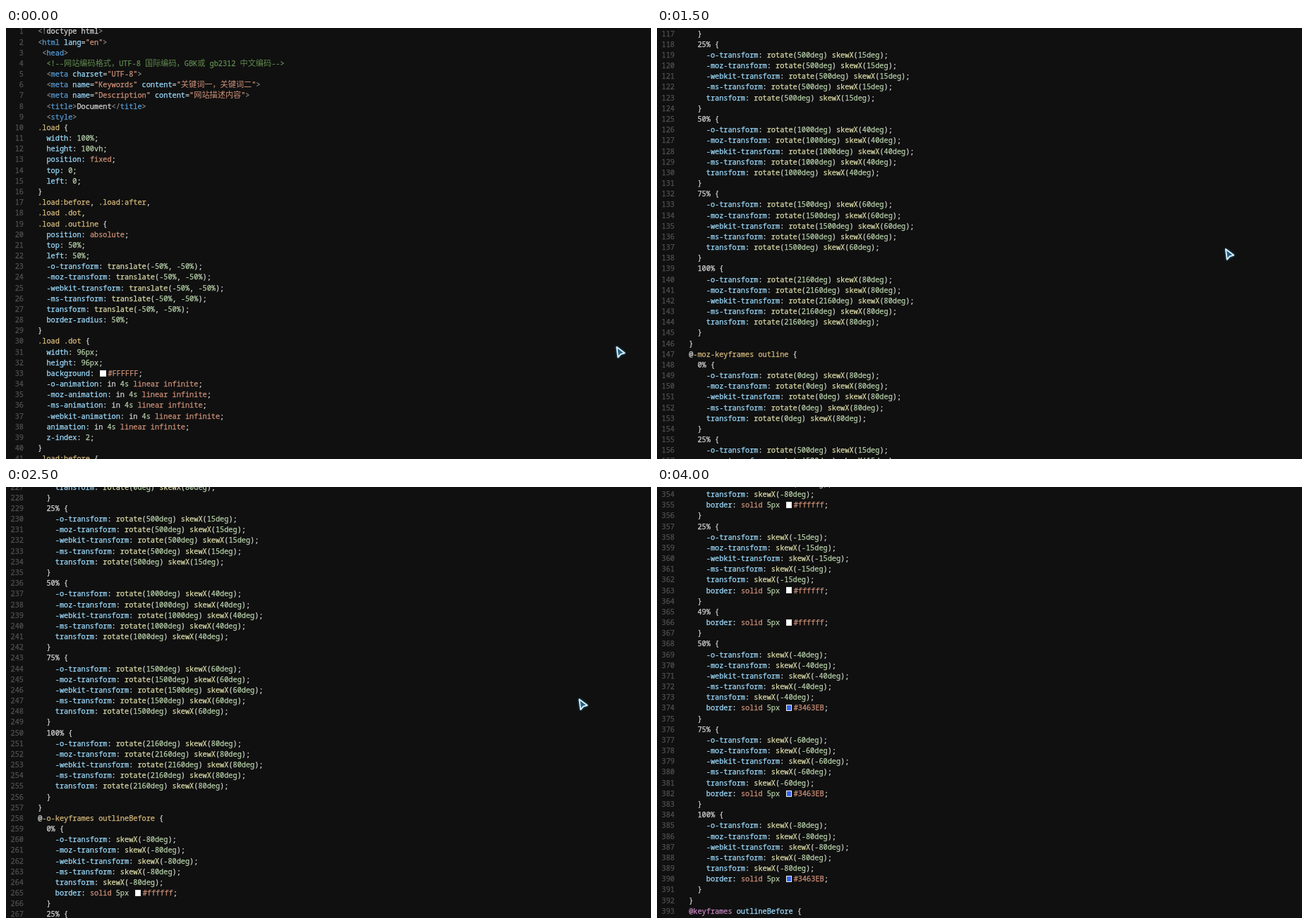
Animation of 914x612 px, one loop 4.1 s. Source, as an HTML page:

```html
<!DOCTYPE html>
<html lang="en">
<head>
<meta charset="UTF-8">
<title>Scrolling stylesheet</title>
<style>
  html, body { margin: 0; width: 100%; height: 100%; overflow: hidden; background: #101010; }
  #stage { position: relative; width: 914px; height: 612px; overflow: hidden; background: #101010; }
  /* The line height is a multiple of 1/64 px, so that rows add up exactly */
  #code {
    position: absolute; left: 0; top: -2.6px; width: 100%;
    font: 10.243px/15.171875px "Noto Sans Mono", "DejaVu Sans Mono", monospace;
    font-variant-ligatures: none; white-space: pre; color: #d4d4d4;
    -webkit-text-stroke: 0.25px;
  }
  .row { position: relative; height: 15.171875px; padding-left: 45.2px; }
  .row b { position: absolute; left: 0; width: 25px; text-align: right; font-weight: 400; color: #505050; }
  .row i { font: 11.175px/0 "Noto Sans CJK SC", "Noto Sans CJK", sans-serif; -webkit-text-stroke: 0; }
  .tag { color: #569cd6; }
  .attr { color: #9cdcfe; }
  .str { color: #ce9178; }
  .note { color: #608b4e; }
  .sel { color: #d7ba7d; }
  .num { color: #b5cea8; }
  .fn { color: #dcdcaa; }
  .mark { color: #808080; }
  .at { color: #c586c0; }
  .chip {
    display: inline-block; box-sizing: border-box; width: 8.94px; height: 8.94px;
    margin: 0 2.235px; border: 1px solid #eee; vertical-align: -0.8px; line-height: 0;
  }
  #pointer { position: absolute; left: 0; top: 0; overflow: visible; filter: drop-shadow(0 0 1.5px #2f7fa8); }
</style>
</head>
<body>
<div id="stage">
  <div id="code"></div>
  <svg id="pointer" width="16" height="20" viewBox="0 0 16 20">
    <path d="M0.9 0.9 L12.2 9.5 L6.6 11.2 L2.8 15.6 Z" fill="#245f80" stroke="#d8eef8" stroke-width="1.9" stroke-linejoin="round"/>
  </svg>
</div>
<script>
// Document text
const rule = (head, decls, pad = '') =>
  [`${pad}${head} {`, ...decls.flat().map(d => `${pad}  ${d};`), `${pad}}`];
const prefixed = (prefixes, prop, value) => prefixes.map(p => `${p}${prop}: ${value}`);
const transform = (value, prop = 'transform') =>
  prefixed(['-o-', '-moz-', '-webkit-', '-ms-', ''], prop, value);
const animation = name =>
  prefixed(['-o-', '-moz-', '-ms-', '-webkit-', ''], 'animation', `${name} 4s linear infinite`);
const size = v => [`width: ${v}`, `height: ${v}`];
const keyframes = (name, stops) => ['-o-', '-moz-', '-webkit-', ''].flatMap(p =>
  [`@${p}keyframes ${name} {`, ...stops.flatMap(([at, decls]) => rule(at + '%', decls, '  ')), '}']);

const turn = (at, angle, skew) => [at, transform(`rotate(${angle}deg) skewX(${skew}deg)`)];
const border = color => `border: solid 5px ${color}`;
const ring = (at, skew, color) => [at, [transform(`skewX(-${skew}deg)`), border(color)]];
const white = '#ffffff', blue = '#3463EB';

const markup = [
  '<!doctype html>',
  '<html lang="en">',
  ' <head>',
  '  <!--网站编码格式，UTF-8 国际编码，GBK或 gb2312 中文编码-->',
  '  <meta charset="UTF-8">',
  '  <meta name="Keywords" content="关键词一，关键词二">',
  '  <meta name="Description" content="网站描述内容">',
  '  <title>Document</title>',
  '  <style>'
];

const styles = [
  rule('.load', ['width: 100%', 'height: 100vh', 'position: fixed', 'top: 0', 'left: 0']),
  '.load:before, .load:after,',
  '.load .dot,',
  rule('.load .outline', ['position: absolute', 'top: 50%', 'left: 50%',
    transform('translate(-50%, -50%)'), 'border-radius: 50%']),
  rule('.load .dot', [size('96px'), 'background: #FFFFFF', animation('in'), 'z-index: 2']),
  rule('.load:before', ['content: ""', size('0px'), 'background: #3A60DB', animation('out1')]),
  rule('.load:after', ['content: ""', size('0px'), 'background: #FFFFFF', animation('out2')]),
  rule('.load .outline', [size('120px'), 'z-index: 2']),
  rule('.load .outline span', [size('68px'), transform('100% 100%', 'transform-origin'),
    transform('rotate(45deg) skewX(80deg)'), 'overflow: hidden', 'position: absolute',
    'bottom: 50%', 'right: 50%', animation('outline')]),
  rule('.load .outline span:before', ['content: ""', 'display: block', border('#fff'),
    size('200%'), 'border-radius: 50%', transform('skewX(-80deg)'),
    animation('outlineBefore'), 'box-sizing: border-box']),
  keyframes('outline', [turn(0, 0, 80), turn(25, 500, 15), turn(50, 1000, 40),
    turn(75, 1500, 60), turn(100, 2160, 80)]),
  keyframes('outlineBefore', [ring(0, 80, white), ring(25, 15, white), [49, [border(white)]],
    ring(50, 40, blue), ring(75, 60, blue), ring(100, 80, blue)])
].flat();

// Syntax colours
const span = (cls, text) => `<span class="${cls}">${text}</span>`;
const cjk = html => html.replace(/[\u3000-\u9fff\uff00-\uffef]+/g, '<i>$&</i>');

function paintMarkup(line) {
  const note = line.match(/^(\s*)<(!--.*--)>$/);
  if (note) return note[1] + span('note', cjk(`&lt;${note[2]}&gt;`));
  return line.replace(/(<[!/]?)(\w+)([^>]*)>/g, (_, open, name, attrs) => {
    const plain = open === '<!';
    const rest = plain ? attrs : attrs.replace(/(\w+)=("[^"]*")/g,
      (_, key, value) => span('attr', key) + '=' + span('str', cjk(value)));
    return span('mark', open.replace('<', '&lt;')) + (plain ? name : span('tag', name)) +
      rest + span('mark', '&gt;');
  });
}

function paintValue(value) {
  return value.replace(/#\w+|""|[a-z]\w*(\(?)|-?\d+(?:%|[a-z]+)?/gi, (word, paren) => {
    if (word[0] === '#') return `<span class="chip" style="background:${word}"></span>` + span('str', word);
    if (paren) return span('fn', word.slice(0, -1)) + paren;
    if (/^(in|out\d|outline\w*)$/.test(word)) return word;
    return span(/\d/.test(word) ? 'num' : 'str', word);
  });
}

function paintStyle(line) {
  const decl = line.match(/^(\s*)([\w-]+): (.*);$/);
  if (decl) return decl[1] + span('attr', decl[2]) + ': ' + paintValue(decl[3]) + ';';
  if (line[0] === '@') {
    const [, head, name] = line.match(/^@(\S+) (\w+)/);
    return (head[0] === '-' ? '@' + span('sel', `${head} ${name}`)
      : span('at', '@' + head) + ' ' + span('attr', name)) + ' {';
  }
  return line.replace(/\.[\w:. ]*\w/g, s => span('sel', s));
}

const code = document.getElementById('code');
const pointer = document.getElementById('pointer');
code.innerHTML = [...markup.map(paintMarkup), ...styles.map(paintStyle)]
  .map((html, i) => `<div class="row"><b>${i + 1}</b>${html}</div>`).join('');

// Motion: the picture advances in 100 ms ticks, the page scrolls in whole wheel notches
const LOOP = 4100, TICK = 100, NOTCH = 50 * 15.171875 / 19, TOP = -2.6;
const wheel = [[0, 0], [5, 12], [11, 25], [18, 59], [25, 86], [32, 112], [33, 116], [34, 116], [40, 134]];
const path = [[0, 864.5, 452], [4, 800, 326], [5, 799.5, 325], [11, 801, 322.5], [18, 808, 306],
  [22, 813.5, 302], [25, 811.5, 300.5], [32, 813, 308], [33, 812, 309]];

function at(keys, tick, col) {
  const k = keys.findIndex(key => key[0] > tick);
  if (k < 0) return keys[keys.length - 1][col];
  const a = keys[k - 1], b = keys[k];
  return a[col] + (b[col] - a[col]) * (tick - a[0]) / (b[0] - a[0]);
}

let shown = -1;
function draw() {
  const tick = Math.floor(performance.now() % LOOP / TICK);
  if (tick !== shown) {
    shown = tick;
    code.style.top = TOP - Math.round(at(wheel, tick, 1)) * NOTCH + 'px';
    pointer.style.transform = `translate(${at(path, tick, 1)}px, ${at(path, tick, 2)}px)`;
    pointer.style.visibility = tick < 40 ? 'visible' : 'hidden';
  }
  requestAnimationFrame(draw);
}
draw();
</script>
</body>
</html>
```
